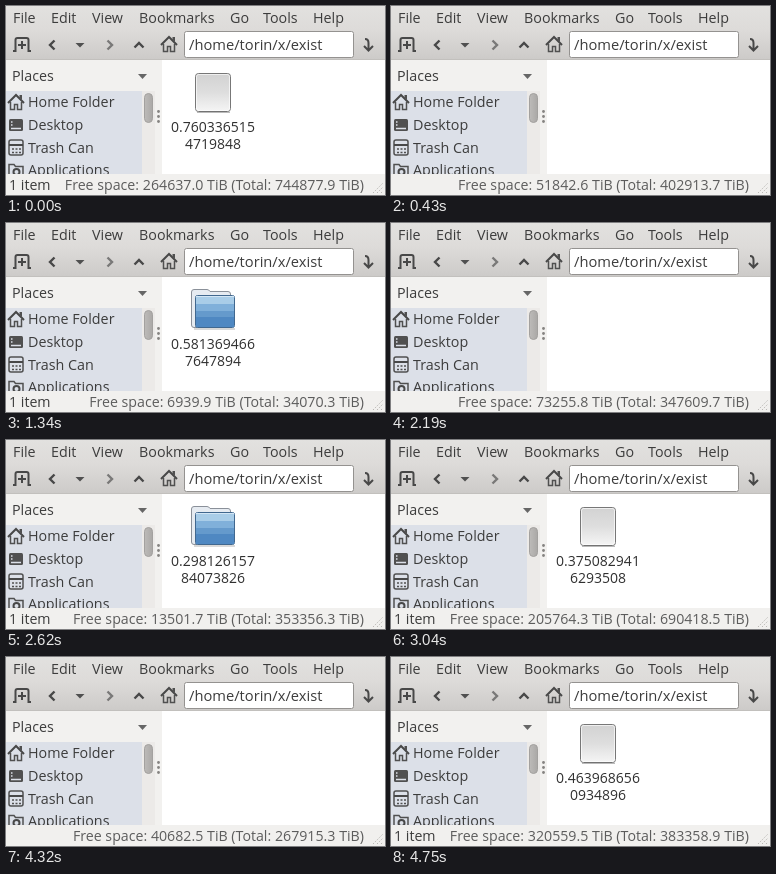
Write an HTML page that moves like this. It is 379x189 px and loops after 4890 ms.

```html
<!DOCTYPE html>
<html lang="en">
<head>
<meta charset="utf-8">
<title>File manager</title>
<style>
html, body { margin: 0; width: 100%; height: 100%; overflow: hidden; background: #f1f0ee; }
svg { display: block; width: 100vw; height: 100vh; }
text { font: 500 14.3px "Open Sans", "Noto Sans", sans-serif; fill: #3c3c3c; white-space: pre; }
.path { font-size: 14.7px; }
.status text { font-size: 14.2px; }
.name text { font-size: 14px; text-anchor: middle; fill: #303030; }
.line { fill: none; stroke: #484848; stroke-width: 2; }
.thin { fill: none; stroke: #505050; stroke-width: 1.5; }
.solid { fill: #505050; }
</style>
</head>
<body>
<svg viewBox="0 0 379 189">
  <defs>
    <linearGradient id="bar" x2="0" y2="1">
      <stop stop-color="#e2e1df"/><stop offset=".45" stop-color="#dddbd9"/><stop offset="1" stop-color="#cccac8"/>
    </linearGradient>
    <linearGradient id="paper" x2="0" y2="1">
      <stop stop-color="#d2d2d2"/><stop offset=".5" stop-color="#dedede"/><stop offset="1" stop-color="#f5f5f5"/>
    </linearGradient>
    <linearGradient id="thumb">
      <stop stop-color="#bdbbb9"/><stop offset="1" stop-color="#aaa8a6"/>
    </linearGradient>
    <g id="home">
      <path class="line" d="M-8 1 L0 -7 L8 1"/>
      <path class="thin" d="M-5.5 0 V7.5 H-1.5 V2.5 H1.5 V7.5 H5.5 V0"/>
      <path class="solid" d="M3.5 -7 H6 V-2 L3.5 -4.5Z"/>
    </g>
    <path id="chevron" class="line" style="stroke-width:2.4" d="M-4.5 -2.5 L0 2 L4.5 -2.5"/>
  </defs>

  <rect width="379" height="54" fill="url(#bar)"/>
  <g id="menu"></g>

  <path class="line" d="M7 45 H9.5 V34 Q9.5 32 11.5 32 H20.5 Q22.5 32 22.5 34 V45 H25 M12 39 H20 M16 35 V43"/>
  <use href="#chevron" transform="translate(46 39) rotate(90)"/>
  <path class="solid" d="M69.5 37 H78.5 L74 41.5Z"/>
  <use href="#chevron" transform="translate(104 39) rotate(-90)" opacity=".65"/>
  <use href="#chevron" transform="translate(133 39) rotate(180)"/>
  <use href="#home" transform="translate(163 38)"/>
  <rect x="178.5" y="25.5" width="169" height="26" rx="2" fill="#fff" stroke="#949290"/>
  <text class="path" x="183" y="44">/home/torin/x/exist</text>
  <path class="line" d="M359 33 Q362.5 33 362.5 37 V44 M358 40 L362.5 44.5 L367 40"/>

  <rect y="54" width="156" height="114" fill="#f2f1ef"/>
  <text x="6" y="75">Places</text>
  <path d="M132 68 H141 L136.5 73Z" fill="#666"/>
  <rect y="85" width="136" height="83" fill="#dce0e8"/>
  <rect x="136" y="85" width="13" height="83" fill="#eceae8"/>
  <rect x="138.5" y="87.5" width="8" height="29" rx="4" fill="url(#thumb)" stroke="#a3a19f"/>
  <g id="grip" fill="#858381"></g>

  <use href="#home" transform="translate(10 96)"/>
  <rect class="solid" x="3" y="113" width="14" height="12" rx="1.5"/>
  <path d="M5 116 H6.5 M5 119 H6.5 M5 122.5 H15" stroke="#dce0e8" stroke-width="1.3"/>
  <rect class="thin" x="3" y="134" width="14" height="15" rx="2"/>
  <path class="line" d="M3 139 H17"/>
  <path class="thin" d="M6 143 H15 M6 146.5 H15" stroke-dasharray="2 1.5"/>
  <path class="thin" d="M3 172 V158.5 H8 L9.5 160.5 H17 V172"/>
  <circle class="line" cx="10.5" cy="166" r="3"/>
  <g id="places"></g>

  <rect x="156" y="54" width="223" height="114" fill="#fff"/>
  <path d="M0 53.5 H379" stroke="#c2c0bd"/>
  <g id="item">
    <g id="file">
      <rect x="189.5" y="67.5" width="35" height="38" rx="3" fill="url(#paper)" stroke="#777"/>
      <rect x="190.5" y="68.5" width="33" height="36" rx="2" fill="none" stroke="#fff" stroke-opacity=".65"/>
      <path d="M191 106.3 H224" stroke="#555" stroke-opacity=".5"/>
    </g>
    <g id="folder">
      <path d="M185.5 102 V69 Q185.5 66.5 188 66.5 H201 Q203 66.5 204 68.5 H222 Q224.5 68.5 224.5 71 V104.5 H188 Q185.5 104.5 185.5 102Z" fill="#e6ebf1" stroke="#8a9099"/>
      <rect x="189.5" y="72.5" width="39" height="32" rx="2" fill="#a9cde8" stroke="#41688f"/>
      <path d="M190 81 H228 V88 H190Z" fill="#80b0da"/>
      <path d="M190 88 H228 V94 H190Z" fill="#659acc"/>
      <path d="M190 94 H228 V104 H190Z" fill="#4f88c2"/>
      <path d="M190 73.5 H228" stroke="#d3e6f5"/>
      <path d="M188 106 H229" stroke="#555" stroke-opacity=".45"/>
    </g>
    <g class="name">
      <text id="head" x="207" y="126"></text>
      <text id="tail" x="207" y="143"></text>
    </g>
  </g>

  <rect y="168" width="379" height="21" fill="#f1f0ee"/>
  <path d="M367 187 L377 177 M371 187 L377 181 M375 187 L377 185" stroke="#bbb9b6" stroke-dasharray="1.5 1.5"/>
  <g class="status">
    <text id="count" x="3" y="184">1 item</text>
    <text id="space" x="358" y="184" text-anchor="end" style="fill:#5c5c5c"></text>
  </g>
</svg>

<script>
const LOOP = 4890, GAP = 40;
// start, folder?, name, free, total; then free and total during the gap that follows
const items = [
  [0, 0, "0.7603365154719848", "264637.0", "744877.9", "51842.6", "402913.7"],
  [470, 1, "0.4182507936180425", "118306.4", "529471.2", "98398.1", "218760.8"],
  [910, 0, "0.8351940276503817", "98398.1", "218760.8", "27415.3", "163082.5"],
  [1340, 1, "0.5813694667647894", "6939.9", "34070.3", "84127.2", "295630.4"],
  [1770, 0, "0.2469175803916254", "142908.5", "618352.7", "73255.8", "347609.7"],
  [2230, 0, "0.9027461835470162", "73255.8", "347609.7", "46093.4", "581247.6"],
  [2620, 1, "0.29812615784073826", "13501.7", "353356.3", "62780.9", "174925.1"],
  [3040, 0, "0.3750829416293508", "205764.3", "690418.5", "31859.2", "246103.8"],
  [3500, 1, "0.6730858855441689", "8702.4", "26436.1", "95316.7", "438572.0"],
  [3910, 1, "0.1594703286815937", "57231.6", "312894.2", "40682.5", "267915.3"],
  [4360, 0, "0.7218364506927183", "187425.9", "506381.4", "234017.8", "471906.2"],
  [4750, 0, "0.4639686560934896", "320559.5", "383358.9"]
];

const $ = id => document.getElementById(id);
const add = (parent, tag, attrs, text = "") => {
  const el = document.createElementNS("http://www.w3.org/2000/svg", tag);
  for (const key in attrs) el.setAttribute(key, attrs[key]);
  el.textContent = text;
  $(parent).append(el);
};
const show = (id, on) => $(id).setAttribute("visibility", on ? "visible" : "hidden");

[["File", 7], ["Edit", 45], ["View", 86], ["Bookmarks", 133], ["Go", 224], ["Tools", 257], ["Help", 307]]
  .forEach(([label, x]) => add("menu", "text", { x, y: 17 }, label));
["Home Folder", "Desktop", "Trash Can", "Applications"]
  .forEach((label, i) => add("places", "text", { x: 22, y: 101 + i * 22.8 }, label));
for (let i = 0; i < 3; i++) add("grip", "circle", { cx: 152.5, cy: 105.5 + i * 5, r: 1.4 });

let shown;
function draw(time) {
  const t = time % LOOP;
  const index = items.findLastIndex(item => item[0] <= t);
  const next = items[index + 1];
  const empty = Boolean(next) && t >= next[0] - GAP;
  const state = index * 2 + empty;
  if (state === shown) return;
  shown = state;
  const [, folder, name, ...sizes] = items[index];
  const [free, total] = sizes.slice(empty ? 2 : 0);
  show("item", !empty);
  show("folder", folder && !empty);
  show("file", !folder && !empty);
  show("count", !empty);
  $("head").textContent = name.slice(0, 11);
  $("tail").textContent = name.slice(11);
  $("space").textContent = `Free space: ${free} TiB (Total: ${total} TiB)`;
}

const start = performance.now();
function tick() {
  draw(performance.now() - start);
  requestAnimationFrame(tick);
}
tick();
</script>
</body>
</html>
```
